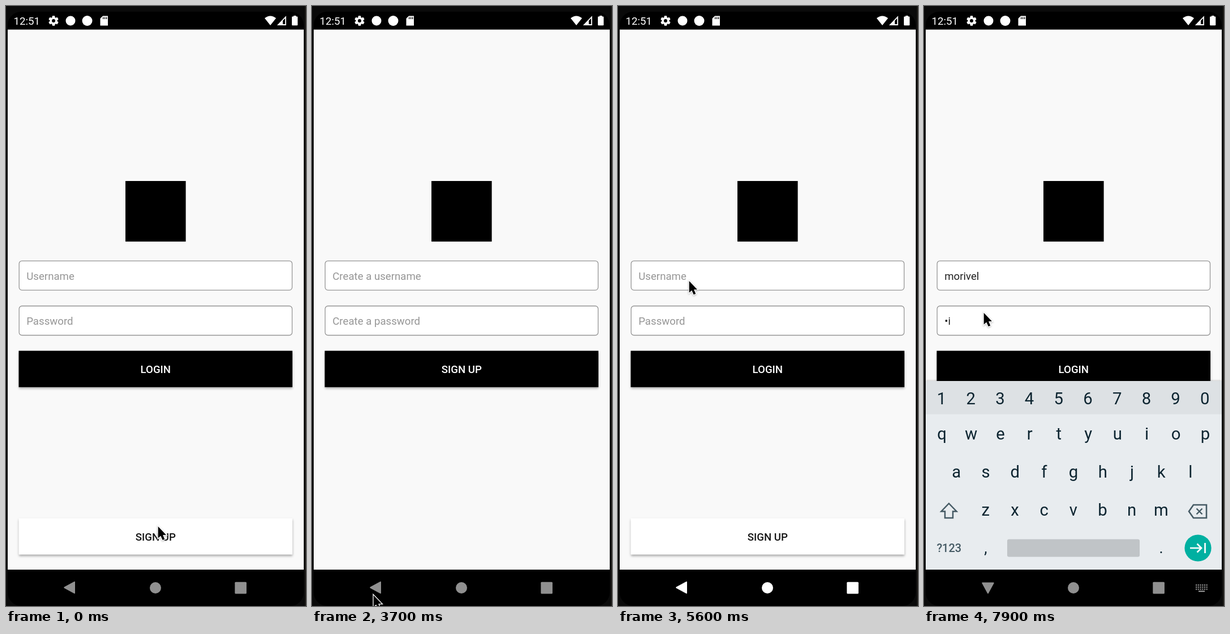
These frames come from a looping animation (530x1056 px, 8 s). An HTML page with a canvas:

```html
<!DOCTYPE html>
<html lang="en">
<head>
<meta charset="utf-8">
<title>Login demo</title>
<style>
html, body { margin: 0; width: 100%; height: 100%; overflow: hidden; background: #0a0a0a; }
canvas { display: block; width: 530px; height: 1056px; }
</style>
</head>
<body>
<canvas id="stage" width="530" height="1056"></canvas>
<script>
const canvas = document.getElementById('stage');
const dpr = window.devicePixelRatio || 1;
canvas.width = 530 * dpr;
canvas.height = 1056 * dpr;
const g = canvas.getContext('2d');

const LOOP = 8000, STEP = 100;
const CX = 264.5, CY = 548;
const NAME = 'morivel';
const INK = '#0c2430', ICON = '#455a64';

// time, x, y of the pointer tip
const POINTER = [
  [200, 268, 915], [300, 250, 862], [500, 170, 600], [700, 128, 499],
  [900, 150, 630], [1100, 181, 869], [1400, 173, 938], [3300, 173, 938],
  [3700, 108, 1036], [4000, 108, 1036], [4200, 109, 1031], [4500, 109, 1031],
  [4700, 135, 674], [5000, 118, 560], [5600, 125, 483], [6050, 125, 483],
  [6400, 105, 539]
];

const clamp = v => Math.max(0, Math.min(1, v));

function pointerAt(t) {
  if (t <= POINTER[0][0]) return POINTER[0].slice(1);
  for (let i = 1; i < POINTER.length; i++) {
    const [t0, x0, y0] = POINTER[i - 1], [t1, x1, y1] = POINTER[i];
    if (t <= t1) {
      const k = (t - t0) / (t1 - t0);
      return [x0 + (x1 - x0) * k, y0 + (y1 - y0) * k];
    }
  }
  return POINTER[POINTER.length - 1].slice(1);
}

function text(str, x, y, size, color, { align = 'left', weight = 400 } = {}) {
  g.font = `${weight} ${size}px Roboto, sans-serif`;
  g.textAlign = align;
  g.fillStyle = color;
  g.fillText(str, x, y);
}

function rect(x, y, w, h, color) {
  g.fillStyle = color;
  g.fillRect(x, y, w, h);
}

function round(x, y, w, h, r, color) {
  g.beginPath();
  g.roundRect(x, y, w, h, r);
  g.fillStyle = color;
  g.fill();
}

function disc(x, y, r, color) {
  g.beginPath();
  g.arc(x, y, r, 0, 7);
  g.fillStyle = color;
  g.fill();
}

function path(points, closed) {
  g.beginPath();
  points.forEach(([x, y], i) => i ? g.lineTo(x, y) : g.moveTo(x, y));
  if (closed) g.closePath();
}

function poly(points, color) {
  path(points, true);
  g.fillStyle = color;
  g.fill();
}

function line(points, color, width, closed) {
  path(points, closed);
  g.strokeStyle = color;
  g.lineWidth = width;
  g.stroke();
}

function shadow(alpha, blur, dy) {
  g.shadowColor = `rgba(0,0,0,${alpha})`;
  g.shadowBlur = blur * dpr;
  g.shadowOffsetY = dy * dpr;
}

const noShadow = () => shadow(0, 0, 0);

function field(y, hint, value, underline) {
  g.beginPath();
  g.roundRect(23.2, y, 482.3, 51.5, 5);
  g.fillStyle = '#fff';
  g.fill();
  g.strokeStyle = '#959595';
  g.lineWidth = 1.3;
  g.stroke();
  text(value || hint, 36.2, y + 33.2, 18.67, value ? '#202020' : '#969696');
  if (value && underline) rect(36.5, y + 35, g.measureText(value).width, 1.3, '#202020');
}

function button(y, label, fill, color, raised) {
  if (raised) shadow(.36, 8, 4);
  else shadow(.34, 4, 2);
  rect(22.5, y, 483.5, 64, fill);
  noShadow();
  text(label, 264.3, y + 39.2, 18.67, color, { align: 'center', weight: 500 });
}

function page(signup, scale, form = {}) {
  g.save();
  g.translate(CX, CY);
  g.scale(scale, scale);
  g.translate(-CX, -CY);
  rect(3, 10, 523, 1046, '#000');
  round(3, 41.5, 523, 950.5, scale > 1.01 ? 14 : 0, '#f9f9f9');
  rect(211, 308, 106.6, 106.6, '#000');
  field(448.6, signup ? 'Create a username' : 'Username', form.user, form.composing);
  field(528, signup ? 'Create a password' : 'Password', form.pass);
  button(606.8, signup ? 'SIGN UP' : 'LOGIN', '#000', '#fff');
  if (!signup) button(901.5, 'SIGN UP', '#fff', '#151515', form.raised);
  g.restore();
}

function gear(x, y) {
  for (let i = 0; i < 6; i++) {
    g.save();
    g.translate(x, y);
    g.rotate(i * Math.PI / 3);
    round(-2.4, -8.8, 4.8, 5, 1, '#fff');
    g.restore();
  }
  g.beginPath();
  g.arc(x, y, 4.8, 0, 7);
  g.strokeStyle = '#fff';
  g.lineWidth = 3.6;
  g.stroke();
}

function statusBar() {
  text('12:51', 13.5, 32.8, 18.67, '#fff');
  gear(84, 26);
  disc(114, 26, 8.5, '#fff');
  disc(143.5, 26, 9, '#fff');
  poly([[171, 17.5], [180, 17.5], [180, 34.5], [166.5, 34.5], [166.5, 22]], '#fff');
  for (const x of [171, 174, 177]) rect(x, 19.5, 1.4, 3.6, '#000');
  g.beginPath();
  g.moveTo(467, 34);
  g.lineTo(457, 21.5);
  g.quadraticCurveTo(467, 13.5, 477, 21.5);
  g.fillStyle = '#fff';
  g.fill();
  line([[481, 33], [494, 33], [494, 19.5]], '#fff', 1.8, true);
  poly([[479.5, 34], [489, 24], [489, 34]], '#fff');
  rect(508, 17, 4.5, 3, '#fff');
  round(505, 18.5, 10.3, 15.8, 1.3, '#fff');
}

function navBar(t) {
  let v = 144;
  if (t >= 3900) v = 144 + 111 * clamp((t - 3800) / 200);
  if (t >= 6900) v = 144 + 111 * (1 - clamp((t - 6950) / 750)) ** 2;
  const color = `rgb(${v},${v},${v})`;

  if (t >= 3900 && t < 4700) {
    const grow = clamp((t - 3800) / 300), fade = clamp((4700 - t) / 200);
    g.save();
    g.globalAlpha = fade;
    round(113.5 - 67.5 * grow, 992.5, 135 * grow, 72, 36, '#0c0c0c');
    g.restore();
  }

  const turn = t < 5900 ? 0 : t < 6000 ? .45 : t < 6100 ? .87 : 1;
  g.save();
  g.translate(113, 1023.5);
  g.rotate(-turn * Math.PI / 2);
  g.lineJoin = 'round';
  const tri = [[-9.7, 0], [8, -9.7], [8, 9.7]];
  poly(tri, color);
  line(tri, color, 2, true);
  g.restore();
  disc(264, 1024, 10, color);
  round(404.3, 1013.8, 20.6, 20.6, 1.5, color);

  if (turn) {
    g.save();
    g.globalAlpha = turn;
    for (let row = 0; row < 3; row++)
      for (let i = 0; i < 6; i++) rect(480 + i * 3.7, 1018 + row * 3.7, 2.2, 2.2, color);
    rect(485, 1029, 11, 2.2, color);
    g.restore();
  }
}

function keyRow(keys, x, y) {
  [...keys].forEach((k, i) => text(k, x + i * 51.7, y, 29.3, INK, { align: 'center' }));
}

function suggestions(typed) {
  const cap = s => s[0].toUpperCase() + s.slice(1);
  const full = cap(NAME);
  const last = typed === NAME ? full + 's' : cap(typed);
  text(typed, 119.5, 699, 24, '#4d5a61', { align: 'center' });
  text(full, 263, 699, 24, '#000', { align: 'center', weight: 700 });
  text(last, 406, 699, 24, '#4d5a61', { align: 'center' });
  rect(187, 674, 1.2, 31, '#bfc3c6');
  rect(338.5, 674, 1.2, 31, '#bfc3c6');
}

function toolStrip(typed) {
  shadow(.25, 3, 1);
  disc(33.5, 689.5, 20, '#fff');
  noShadow();
  line([[30, 682.5], [37, 689.5], [30, 696.5]], '#37474f', 2.5);
  round(496.3, 677, 7.4, 15.5, 3.7, ICON);
  g.beginPath();
  g.arc(500, 689, 7.6, 0, Math.PI);
  g.strokeStyle = ICON;
  g.lineWidth = 2.2;
  g.stroke();
  rect(498.9, 696, 2.2, 6, ICON);
  if (typed) suggestions(typed);
}

function smiley(x, y) {
  g.strokeStyle = ICON;
  g.lineWidth = 2.5;
  g.beginPath();
  g.arc(x, y, 12, 0, 7);
  g.stroke();
  g.beginPath();
  g.arc(x, y + 1, 6.3, .35, Math.PI - .35);
  g.stroke();
  disc(x - 4.3, y - 3.8, 1.9, ICON);
  disc(x + 4.3, y - 3.8, 1.9, ICON);
}

function keyboard(dy, alpha, typed, secret) {
  // painted as one layer so the fade shows the page evenly
  g.save();
  g.translate(0, dy);
  g.globalAlpha = alpha;
  if (alpha === 1) shadow(.2, 3, -1);
  rect(3, 660, 523, 332, '#e8ecef');
  noShadow();
  rect(3, 660, 523, 58.5, typed || secret ? '#dde1e4' : '#e1e2e6');

  if (secret) keyRow('1234567890', 31, 701);
  else toolStrip(typed);

  keyRow('qwertyuiop', 31.6, 763);
  if (!secret) [...'1234567890'].forEach((k, i) =>
    text(k, 47 + i * 51.8, 741.5, 13, '#667278', { align: 'center', weight: 500 }));
  keyRow('asdfghjkl', 57.3, 830);
  keyRow('zxcvbnm', 108.7, 897);

  line([[44, 875.5], [57.5, 889.5], [51, 889.5], [51, 901], [37, 901], [37, 889.5], [30.5, 889.5]], ICON, 2.5, true);
  line([[468, 889.5], [476, 878], [499, 878], [499, 901], [476, 901]], ICON, 2.6, true);
  line([[481.5, 884.5], [491.5, 894.5]], ICON, 2.4);
  line([[491.5, 884.5], [481.5, 894.5]], ICON, 2.4);

  text('?123', 44.3, 961, 20, ICON, { align: 'center', weight: 500 });
  text(',', 109, 963, 27, INK, { align: 'center' });
  text('.', 419, 963, 27, INK, { align: 'center' });
  if (!secret) smiley(160, 954);
  const left = secret ? 147 : 198.5;
  round(left, 938.5, 381 - left, 31, 3, '#c0c4c7');

  disc(484, 954, 23.6, '#00b0a1');
  if (secret) {
    line([[470, 954], [489, 954]], '#fff', 2.7);
    line([[482.5, 946.5], [490, 954], [482.5, 961.5]], '#fff', 2.7);
    line([[496.5, 945], [496.5, 963]], '#fff', 2.7);
  } else {
    line([[495.5, 947], [495.5, 954.5], [473, 954.5]], '#fff', 2.7);
    line([[479.5, 947.5], [472.5, 954.5], [479.5, 961.5]], '#fff', 2.7);
  }
  g.restore();
}

function pointer([x, y]) {
  const shape = [[0, 0], [0, 20.5], [4.6, 16.4], [8, 24], [11.6, 22.4], [8.4, 15], [14.3, 15]];
  g.save();
  g.translate(x + .7, y + 1);
  g.lineJoin = 'miter';
  shadow(.3, 3, 1);
  line(shape, '#fff', 2.6, true);
  noShadow();
  poly(shape, '#000');
  g.restore();
}

function windows(t) {
  if (t >= 2300 && t < 4300) {
    if (t < 2600) {
      page(false, 1.0375);
      rect(3, 1003, 523, 6, '#e4e4e4');
    }
    page(true, t < 2600 ? 1 - .0316 * Math.exp((2300 - t) / 80) : 1);
    return;
  }
  const zoom = t >= 4300 && t < 4600 ? 1 + .1 * Math.exp((4200 - t) / 80) : 1;
  const count = Math.max(0, Math.min(NAME.length, Math.floor((t - 6800) / 100)));
  const user = NAME.slice(0, count);
  const secret = t >= 7600;
  const pass = t >= 7900 ? '•i' : t >= 7800 ? 'm' : '';
  page(false, zoom, { user, pass, composing: !secret, raised: t >= 2100 && t < 2300 });

  if (t >= 6100) keyboard(0, 1, user, secret);
  else if (t >= 6000) keyboard(5, .92, '', false);
  else if (t >= 5900) keyboard(18, .5, '', false);
}

function draw(t) {
  g.setTransform(dpr, 0, 0, dpr, 0, 0);
  rect(0, 0, 530, 1056, '#0a0a0a');
  rect(528, 0, 2, 1056, '#1d1b18');
  g.save();
  g.beginPath();
  g.roundRect(3, 10, 523, 1046, 24);
  g.clip();
  windows(t);
  statusBar();
  navBar(t);
  g.restore();
  pointer(pointerAt(t));
}

const start = performance.now();

function tick() {
  const t = (performance.now() - start) % LOOP;
  draw(Math.floor(t / STEP) * STEP);
  requestAnimationFrame(tick);
}
tick();
</script>
</body>
</html>
```
